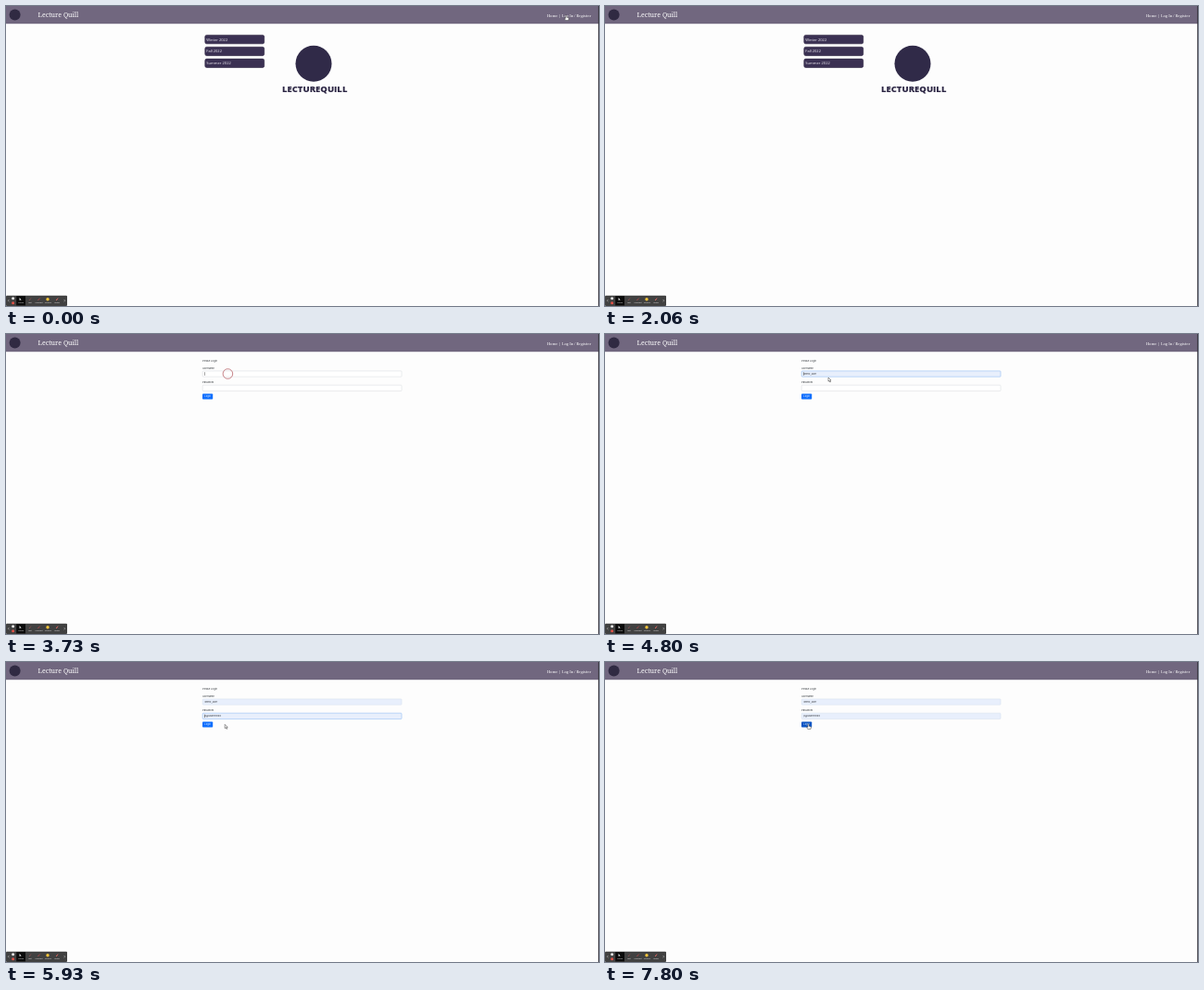
These frames come from a looping animation (640x324 px, 8 s). An HTML page:

```html
<!DOCTYPE html>
<html lang="en">
<head>
<meta charset="utf-8">
<title>Lecture Quill</title>
<style>
  html, body { margin: 0; width: 100%; height: 100%; overflow: hidden; background: #fdfdfd; }
  svg { display: block; width: 100vw; height: 100vh; }
  text { font-family: "Open Sans", "Noto Sans", sans-serif; }
  .serif { font-family: "Noto Serif", serif; fill: #fff; }
  .term rect { fill: #3b3153; stroke: #2c2440; stroke-width: .6; }
  .term text { font-size: 4.05px; fill: #f4f2f8; }
  #login text { font-family: Inter, Roboto, sans-serif; font-size: 2.65px; fill: #30353a; }
  #login .button-label { fill: #fff; font-size: 2.5px; }
  .field { stroke-width: .5; }
  #toolbar text { font-family: Roboto, sans-serif; font-size: 2px; fill: #e4e4e4; text-anchor: middle; }
</style>
</head>
<body>
<svg viewBox="0 0 640 324" preserveAspectRatio="none">
  <rect width="640" height="324" fill="#fdfdfd"/>
  <rect width="640" height="19.2" fill="#71677f"/>
  <circle cx="9.6" cy="9.4" r="6" fill="#302a42"/>
  <text class="serif" x="34.6" y="11.5" font-size="7">Lecture Quill</text>
  <text class="serif" x="631.4" y="11.7" font-size="4.1" font-weight="500" text-anchor="end">Home | Log In / Register</text>

  <g id="home">
    <g id="terms"></g>
    <circle cx="332" cy="62.3" r="19.5" fill="#302a48"/>
    <text x="333.2" y="93" font-size="9.5" font-weight="800" fill="#2d2745" text-anchor="middle">LECTUREQUILL</text>
  </g>

  <g id="login">
    <text x="212" y="30.4">Please Login</text>
    <text x="212" y="37.5">Username</text>
    <rect id="userField" class="field" x="212.2" y="39.9" width="214.8" height="6.3" rx=".8"/>
    <text id="userText" x="214.4" y="44">demo_user</text>
    <text x="212" y="53">Password</text>
    <rect id="passField" class="field" x="212.2" y="55.2" width="214.8" height="6.4" rx=".8"/>
    <text id="passText" x="214.4" y="59.3">p@ssword123</text>
    <rect id="caret" x="214.2" width=".45" height="3.6" fill="#333"/>
    <rect id="button" x="212" y="64.4" width="11.2" height="6.2" rx=".8"/>
    <text class="button-label" x="217.6" y="68.4" text-anchor="middle">Login</text>
  </g>

  <g id="toolbar">
    <rect y="312.7" width="66" height="11.3" rx="1" fill="#414141"/>
    <rect x="11.2" y="313.3" width="9.8" height="10.1" fill="#0b0b0b"/>
    <path d="M3.4 317l-1.1 1.2 1.1 1.2M62.6 317l1.1 1.2-1.1 1.2" fill="none" stroke="#ddd" stroke-width=".5"/>
    <circle cx="7.6" cy="315.8" r="1.5" fill="#e8e8e8"/>
    <circle cx="7.6" cy="320.8" r="1.5" fill="#e05248"/>
    <path d="M14.6 314.9v3.2l.8-.7 1.2.1z" fill="#fff"/>
    <path d="M25 318l2-2.4" stroke="#a55" stroke-width=".6"/>
    <path d="M34.3 318l2.4-2.4" stroke="#d84b4b" stroke-width=".7"/>
    <circle cx="45" cy="316.7" r="1.7" fill="#f2c33b"/>
    <path d="M54.2 318l1.8-2.4" stroke="#e46a62" stroke-width="1"/>
  </g>

  <circle id="ring" fill="none" stroke="#b9656b" stroke-width=".8"/>
  <g id="cursor" stroke="#222" stroke-width=".45" stroke-linejoin="round" fill="#fff">
    <path id="arrow" d="M0 0V4.2L1 3.3 1.8 5 2.5 4.7 1.8 3H3z"/>
    <path id="hand" d="M-.6.4Q0-.5.6.4V2.2L2.6 2.8Q3.2 3.2 2.5 5.4H-.8L-2 3.4Q-1.7 2.6-.6 3.5z"/>
  </g>
  <rect x="639.2" width=".8" height="324" fill="#34313a"/>
</svg>
<script>
const LOOP = 8000;
const $ = id => document.getElementById(id);
const set = (id, attrs) => {
  for (const name in attrs) $(id).setAttribute(name, attrs[name]);
};
const show = (id, visible) => set(id, { visibility: visible ? "visible" : "hidden" });

$("terms").innerHTML = ["Winter", "Fall", "Summer"].map((season, i) =>
  `<g class="term" transform="translate(0 ${i * 12.85})">
    <rect x="214.8" y="31.4" width="63.9" height="9.4" rx="1.8"/>
    <text x="216.3" y="37.6">${season} 2022</text></g>`).join("");

$("toolbar").insertAdjacentHTML("beforeend",
  ["Mouse", "Text", "Highlight", "Stickers", "Eraser"].map((label, i) =>
    `<text x="${16 + i * 9.8}" y="321.4">${label}</text>`).join(""));

// Cursor stops: time, x, y
const stops = [
  [0, 604.6, 10], [660, 604.6, 10], [800, 602, 12], [1600, 295, 43], [1730, 294, 46],
  [3730, 239.4, 43], [4000, 239.4, 43], [4330, 241, 47],
  [5060, 241, 47], [5260, 240, 48], [5600, 240, 48], [5700, 238, 57],
  [5780, 238, 57], [5930, 236.2, 67.4], [6460, 236.2, 67.4],
  [7000, 219.2, 67], [LOOP, 219.6, 67]
];
const clicks = [[3730, 239.4, 43], [5700, 238, 58]];

function cursorAt(t) {
  const next = Math.max(1, stops.findIndex(stop => stop[0] > t));
  const [t0, x0, y0] = stops[next - 1], [t1, x1, y1] = stops[next];
  const p = (t - t0) / (t1 - t0), eased = p * p * (3 - 2 * p);
  return [x0 + (x1 - x0) * eased, y0 + (y1 - y0) * eased];
}

function styleField(id, filled, focused) {
  set(id, {
    fill: filled ? "#e8effc" : "#fff",
    stroke: focused ? "#83b2f2" : filled ? "#d3dced" : "#d5d8dc"
  });
}

function draw(t) {
  const loginOpen = t >= 2260;
  const userFocused = t >= 3730 && t < 5700;
  const passFocused = t >= 5700 && t < 7400;
  const userFilled = t >= 4330, passFilled = t >= 5800;
  show("home", !loginOpen);
  show("login", loginOpen);
  styleField("userField", userFilled, userFocused && t >= 3900);
  styleField("passField", passFilled, passFocused);
  show("userText", loginOpen && userFilled);
  show("passText", loginOpen && passFilled);

  const blinkStart = userFocused ? 3730 : 5400;
  show("caret", (userFocused || passFocused) && (t - blinkStart) % 1070 < 600);
  set("caret", { y: userFocused ? 41.2 : 56.6 });

  const [x, y] = cursorAt(t);
  const onButton = t > 6700 && x < 223.5;
  const onLink = t < 850;
  set("button", { fill: onButton ? "#0b55c4" : "#0d6efd" });
  set("cursor", { transform: `translate(${x} ${y})` });
  show("arrow", !onLink && !onButton && (t < 2060 || t >= 4000));
  show("hand", onLink || onButton);

  const click = clicks.find(([start]) => t >= start && t < start + 220);
  show("ring", click);
  if (click) set("ring", { cx: click[1], cy: click[2], r: 5.3 });
}

function tick(now) {
  draw(now % LOOP);
  requestAnimationFrame(tick);
}
draw(0);
requestAnimationFrame(tick);
</script>
</body>
</html>
```
